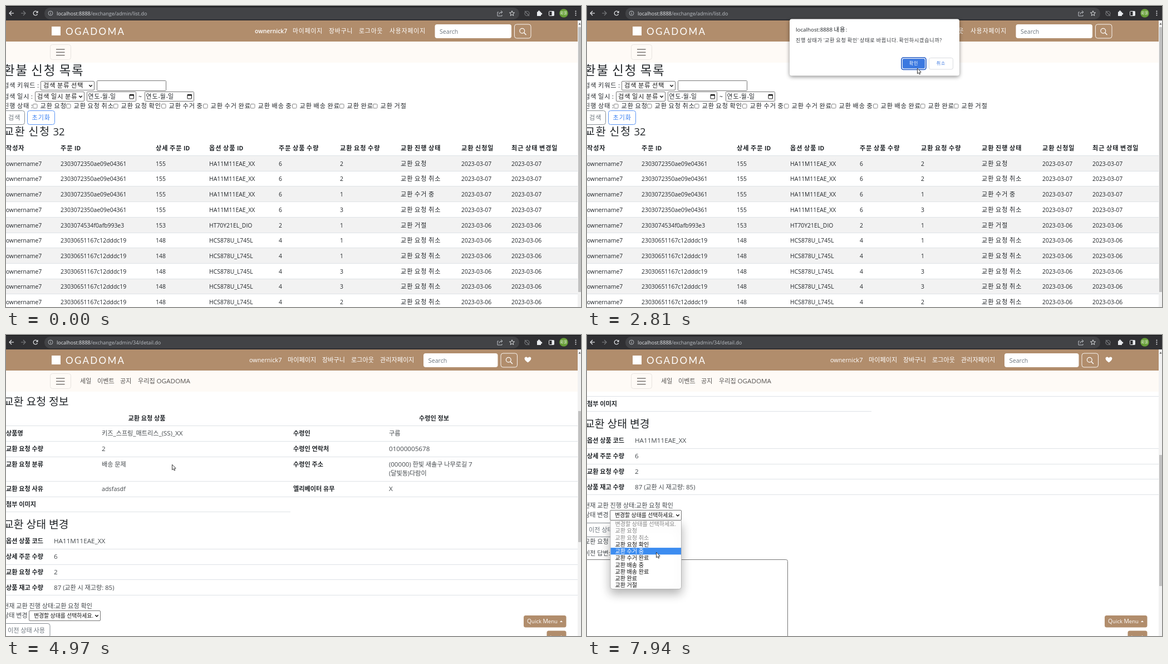
Recreate the animation shown at these times as an HTML page with a canvas. Size 1033 px wide and 542 px high, loop 8000 ms.

```html
<!DOCTYPE html>
<html lang="ko">
<head>
<meta charset="utf-8">
<title>Exchange admin</title>
<style>
html, body { margin: 0; width: 100%; height: 100%; overflow: hidden; background: #fff; }
canvas { display: block; }
</style>
</head>
<body>
<canvas id="stage" width="1033" height="542"></canvas>
<script>
const ctx = document.getElementById('stage').getContext('2d');
const LOOP = 8000, W = 1033, H = 542, VIEW = 1027;
const INK = '#212529', GRAY = '#6c757d', LINE = '#dee2e6', BROWN = '#b18d6c';
const BRAND = 'OGADOMA';

// Relative glyph sizes and Korean letter spacing of the two page typefaces
const LIST = { hangul: 1.07, caps: 1, spacing: 0.09 };
const DETAIL = { hangul: 1.03, caps: 1.08, spacing: 0 };
let face = LIST;

const NAV = 3500, DIALOG_IN = 1980, DIALOG_OUT = 3090, MENU_OPEN = 7290;
const POINTER = [
  [70, 984, 391], [200, 835, 140], [270, 700, 96], [400, 471, 205], [590, 471, 205],
  [1060, 207, 279], [1260, 206, 279], [1530, 206, 279], [1660, 217, 279],
  [1850, 217, 279], [1920, 224, 280], [2340, 224, 280], [2740, 593, 112],
  [3160, 593, 112], [3900, 320, 256], [4100, 320, 256], [4160, 330, 238],
  [4490, 330, 238], [4970, 298, 233], [5170, 275, 234], [5600, 88, 372],
  [5970, 215, 375], [6050, 215, 375], [6400, 234, 374], [6560, 234, 374],
  [6850, 262, 352], [7180, 150, 315], [7330, 150, 315], [7670, 125, 392],
  [7840, 125, 392], [7880, 124, 391], [8000, 124, 391]
];
const SCROLL = [[4500, 0], [4660, 67], [4970, 222], [5100, 336], [6540, 336], [6800, 404]];

const clamp = v => Math.max(0, Math.min(1, v));
const smooth = v => v * v * (3 - 2 * v);

function track(keys, t, ease = v => v) {
  let i = 0;
  while (i < keys.length - 2 && t > keys[i + 1][0]) i++;
  const a = keys[i], b = keys[i + 1];
  const p = ease(clamp((t - a[0]) / (b[0] - a[0])));
  return a.slice(1).map((v, k) => v + (b[k + 1] - v) * p);
}

// Draws mixed Korean and Latin text, centred vertically on y; returns its end
function text(str, x, y, { size = 10.4, color = INK, weight = 400, align = 'left' } = {}) {
  const runs = str.match(/[가-힣]+|[0-9A-Z_]+|[^가-힣0-9A-Z_]+/g).map(s => {
    const hangul = /[가-힣]/.test(s);
    const scale = hangul ? face.hangul : /[0-9A-Z_]/.test(s) ? face.caps : 1;
    const family = hangul ? '"Noto Sans CJK KR", "Noto Sans CJK", sans-serif'
                          : '"Open Sans", "Noto Sans", sans-serif';
    const thickness = hangul && weight === 400 ? 300 : weight;
    const font = `${thickness} ${size * scale}px ${family}`;
    const spacing = `${hangul ? size * face.spacing : 0}px`;
    ctx.font = font;
    ctx.letterSpacing = spacing;
    return { s, font, spacing, width: ctx.measureText(s).width };
  });
  if (align === 'center') x -= runs.reduce((sum, r) => sum + r.width, 0) / 2;
  ctx.fillStyle = color;
  for (const r of runs) {
    ctx.font = r.font;
    ctx.letterSpacing = r.spacing;
    ctx.fillText(r.s, x, y + size * 0.36);
    x += r.width;
  }
  return x;
}

function rect(x, y, w, h, color) {
  ctx.fillStyle = color;
  ctx.fillRect(x, y, w, h);
}

function rule(y, w = VIEW) {
  rect(0, Math.floor(y), w, 1, LINE);
}

function box(x, y, w, h, r, fill, stroke, width = 1) {
  ctx.beginPath();
  ctx.roundRect(x, y, w, h, r);
  if (fill) { ctx.fillStyle = fill; ctx.fill(); }
  if (stroke) { ctx.strokeStyle = stroke; ctx.lineWidth = width; ctx.stroke(); }
}

function path(points, { stroke, fill, width = 1.2, close = false }) {
  ctx.beginPath();
  points.forEach(([x, y]) => ctx.lineTo(x, y));
  if (close) ctx.closePath();
  if (fill) { ctx.fillStyle = fill; ctx.fill(); }
  if (stroke) { ctx.strokeStyle = stroke; ctx.lineWidth = width; ctx.stroke(); }
}

function arc(x, y, r, { stroke, fill, width = 1.2, from = 0, to = Math.PI * 2 }) {
  ctx.beginPath();
  ctx.arc(x, y, r, from, to);
  if (fill) { ctx.fillStyle = fill; ctx.fill(); }
  if (stroke) { ctx.strokeStyle = stroke; ctx.lineWidth = width; ctx.stroke(); }
}

function shadowed(blur, dy, color, draw) {
  ctx.save();
  ctx.shadowBlur = blur;
  ctx.shadowOffsetY = dy;
  ctx.shadowColor = color;
  draw();
  ctx.restore();
}

function toolbar(page) {
  const light = '#e8eaed', dim = '#77797c', soft = '#bdc1c6';
  rect(0, 0, W, 26, '#303033');
  rect(0, 0, W, 1, '#111214');
  box(69, 3, 853, 21, 10, '#424346');
  const arrow = (x, dir, stroke) => {
    path([[x - 4 * dir, 13], [x + 4 * dir, 13]], { stroke });
    path([[x, 9], [x + 4 * dir, 13], [x, 17]], { stroke });
  };
  arrow(10, -1, light);
  arrow(31, 1, dim);
  arc(53, 13, 3.8, { stroke: light, from: 0.4, to: 5.5 });
  path([[57.5, 8.5], [57.5, 12.5], [53.5, 12.5]], { fill: light });
  arc(80, 13, 4, { stroke: soft, width: 0.9 });
  rect(79.5, 12.3, 1, 3, soft);
  rect(79.5, 10.5, 1, 1, soft);
  const end = text('localhost:8888', 91, 13.5, { size: 9, color: light });
  text(`/exchange/admin/${page}.do`, end, 13.5, { size: 9, color: soft });

  path([[885, 11], [883, 11], [883, 18], [891, 18], [891, 16]], { stroke: soft, width: 1 });
  path([[886, 15], [887, 12], [891, 11]], { stroke: soft, width: 1 });
  path([[889, 8.5], [892, 11], [889, 13.5]], { stroke: soft, width: 1 });
  const star = Array.from({ length: 10 }, (_, i) => {
    const a = i * Math.PI / 5 - Math.PI / 2, r = i % 2 ? 2.1 : 4.8;
    return [909 + r * Math.cos(a), 13.5 + r * Math.sin(a)];
  });
  path(star, { stroke: light, width: 0.9, close: true });
  arc(936, 13.5, 4, { stroke: dim });
  path([[932, 9], [940, 18]], { stroke: dim });
  rect(954, 10.5, 7, 7.5, light);
  arc(957.5, 10, 1.8, { fill: light });
  arc(961.5, 14, 1.8, { fill: light });
  box(975.5, 9.5, 9, 8, 1, null, light);
  rect(980.5, 9.5, 4, 8, light);
  arc(1002, 13, 7.8, { fill: '#689f38' });
  text('회원', 1002, 13, { size: 6, color: '#fff', align: 'center' });
  for (const y of [9.5, 13, 16.5]) arc(1023.5, y, 1, { fill: light });
}

function siteHeader(detail) {
  rect(0, 26, VIEW, 38, BROWN);
  rect(0, 64, VIEW, 38, '#fefaf6');
  rect(82, 37, 16, 16, '#fff');
  ctx.save();
  ctx.font = '400 17px Lato, sans-serif';
  ctx.letterSpacing = '2.3px';
  ctx.fillStyle = '#fff';
  ctx.fillText(BRAND, 107, 51.5);
  ctx.restore();

  const links = detail
    ? [['ownernick7', 437], ['마이페이지', 506], ['장바구니', 568], ['로그아웃', 620], ['관리자페이지', 672]]
    : [['ownernick7', 447], ['마이페이지', 515], ['장바구니', 580], ['로그아웃', 634], ['사용자페이지', 689]];
  links.forEach(([label, x], i) => text(label, x, 45.3,
    { size: detail ? 10.8 : i ? 10.1 : 10.4, color: '#fff', weight: detail ? 400 : i ? 500 : 600 }));
  const x = detail ? 750 : 770.5, w = detail ? 133.5 : 137.5;
  box(x, 33, w, 25, 4, '#fff');
  text('Search', x + 8.5, 45.7, { size: 10.6, color: GRAY });
  const bx = x + w + 5.5;
  box(bx, 33, 29.5, 25, 4, null, '#f8f4f0');
  arc(bx + 13.8, 44.8, 4.4, { stroke: '#fff' });
  path([[bx + 17, 48], [bx + 21, 52]], { stroke: '#fff', width: 1.4 });
  if (detail) {
    ctx.fillStyle = '#fff';
    ctx.beginPath();
    ctx.moveTo(937.5, 49.5);
    ctx.bezierCurveTo(926.5, 43, 933.5, 36.5, 937.5, 41.2);
    ctx.bezierCurveTo(941.5, 36.5, 948.5, 43, 937.5, 49.5);
    ctx.fill();
  }

  box(79.5, 69.5, 37, 27, 4, null, '#e8e4e0');
  for (const y of [78, 83.3, 88.6]) rect(90, y - 0.6, 15.5, 1.3, '#66625f');
  if (detail) {
    [['세일', 133], ['이벤트', 164], ['공지', 205], [`우리집 ${BRAND}`, 237]]
      .forEach(([label, lx]) => text(label, lx, 83.3, { size: 10.8, color: '#555250', weight: 500 }));
  }
}

function scrollbar(top, height) {
  rect(VIEW, 26, W - VIEW, H - 26, '#f1f1f1');
  path([[1028.5, 33.5], [1030.5, 30.5], [1032.5, 33.5]], { fill: '#555' });
  rect(1028, top, 5, height, '#c1c1c1');
}

function select(x, y, w, h, label, tx, size) {
  box(x + 0.5, y + 0.5, w - 1, h - 1, 1.5, '#fff', '#767676');
  text(label, tx, y + h / 2, { size, color: '#111' });
  const cx = x + w - 7, cy = y + h / 2;
  path([[cx - 2.7, cy - 1.3], [cx, cy + 1.5], [cx + 2.7, cy - 1.3]], { stroke: '#111', width: 1.4 });
}

function dateInput(x) {
  box(x + 0.5, 154.5, 88, 17, 1, '#fff', '#767676');
  text('연도-월-일', x + 2.5, 163, { size: 10.2 });
  box(x + 77, 159.5, 7.5, 7.5, 0.5, null, '#111');
  rect(x + 77, 159, 7.5, 2.5, '#111');
}

const STATES = ['교환 요청', '교환 요청 취소', '교환 요청 확인', '교환 수거 중', '교환 수거 완료',
  '교환 배송 중', '교환 배송 완료', '교환 완료', '교환 거절'];
const CHECK_X = [48, 108, 193, 279, 354, 439, 514, 599, 659];
const COLUMNS = [['작성자', 0], ['주문 ID', 98], ['상세 주문 ID', 269], ['옵션 상품 ID', 365],
  ['주문 상품 수량', 490], ['교환 요청 수량', 600], ['교환 진행 상태', 709],
  ['교환 신청일', 818], ['최근 상태 변경일', 908]];
const A = ['2303072350ae09e04361', '155', 'HA11M11EAE_XX', '6'];
const B = ['2303074534f0afb993e3', '153', 'HT70Y21EL_DIO', '2'];
const C = ['23030651167c12dddc19', '148', 'HCS878U_L745L', '4'];
const ROWS = [[A, 2, 0], [A, 2, 1], [A, 1, 3], [A, 3, 1], [B, 1, 8],
  [C, 1, 1], [C, 1, 1], [C, 3, 1], [C, 3, 1], [C, 2, 1]];

function listPage() {
  face = LIST;
  text('환불 신청 목록', -5, 116.5, { size: 20.9 });
  text('검색 키워드 :', -5, 143);
  select(62, 135, 97, 17, '검색 분류 선택', 67, 10.4);
  box(163.5, 134.5, 124, 18, 1, '#fff', '#767676');
  text('검색 일시 :', -5, 163);
  select(52, 154, 89, 18, '검색 일시 분류', 56, 10.4);
  dateInput(145);
  text('~', 238, 163);
  dateInput(249);
  text('진행 상태 :', -5, 180);
  STATES.forEach((s, i) => {
    box(CHECK_X[i] + 0.5, 176.5, 7.5, 7.5, 1.5, '#fff', '#767676', 0.9);
    text(s, CHECK_X[i] + 13.5, 180);
  });
  box(-10, 188.5, 43.5, 25, 4, null, '#858c93');
  text('검색', 4, 201, { color: GRAY });
  box(38.5, 188.5, 49, 25, 4, null, '#5a94f5');
  text('초기화', 46.5, 201, { color: '#3a80f2' });
  text('교환 신청 32', -4, 226, { size: 18.4 });

  COLUMNS.forEach(([label, x]) => text(label, x, 256, { weight: 700 }));
  ROWS.forEach(([order, count, state], i) => {
    const top = Math.floor(269.5 + i * 27.7), y = 284 + i * 27.7;
    if (i % 2 === 0) rect(0, top, VIEW, 28, '#f2f2f2');
    rule(top);
    const day = i < 4 ? '2023-03-07' : '2023-03-06';
    ['ownername7', ...order, String(count), STATES[state], day, day]
      .forEach((cell, k) => text(cell, COLUMNS[k][1], y));
  });
  siteHeader(false);
  scrollbar(38, 477);
}

const ORDER = [['주문 날짜', '2023-03-07 01:24'], ['주문번호', '2303072350ae09e04361'],
  ['총 구매 금액', '2516000'], ['주문자', 'ownername7'], ['주문자 전화번호', '01000001234'],
  ['주문자 이메일', 'own7@example.com'], ['주문 상품', '사이드테이블(조명)_FK 등 2건']];
const REQUEST = [
  [400.5, '상품명', '키즈_스프링_매트리스_(SS)_XX', '수령인', '구름'],
  [428.2, '교환 요청 수량', '2', '수령인 연락처', '01000005678'],
  [456, '교환 요청 분류', '배송 문제', '수령인 주소', '(00000) 한빛 새솔구 나무로길 7'],
  [500, '교환 요청 사유', 'adsfasdf', '엘리베이터 유무', 'X']];
const STOCK = [['옵션 상품 코드', 'HA11M11EAE_XX'], ['상세 주문 수량', '6'],
  ['교환 요청 수량', '2'], ['상품 재고 수량', '87 (교환 시 재고량: 85)']];
const PROMPT = '변경할 상태를 선택하세요.';

function detailPage(scroll) {
  face = DETAIL;
  const value = (s, x, y) => text(s, x, y, { size: 10.8, color: '#43484c' });
  const label = (s, x, y) => text(s, x, y, { size: 10.8, weight: 700 });
  const heading = (s, y) => text(s, -4, y, { size: 18.8 });

  ctx.save();
  ctx.translate(0, -Math.round(scroll));
  heading('주문 내역', 110);
  ORDER.forEach(([k, v], i) => {
    const y = 140 + i * 27.7;
    label(k, 0, y);
    value(v, 344, y);
    rule(y + 13.7);
  });
  heading('교환 요청 정보', 343);
  text('교환 요청 상품', 253, 373, { size: 10.8, weight: 700, align: 'center' });
  text('수령인 정보', 769, 373, { size: 10.8, weight: 700, align: 'center' });
  [386.7, 414.4, 442.1, 486.3, 514].forEach(y => rule(y));
  for (const [y, k, v, k2, v2] of REQUEST) {
    label(k, 0, y);
    value(v, 172, y);
    label(k2, 516, y);
    value(v2, 688, y);
  }
  value('(달빛동)다람이', 688, 472);
  label('첨부 이미지', 0, 527.7);
  rule(541.7, 511);

  heading('교환 상태 변경', 564.7);
  STOCK.forEach(([k, v], i) => {
    const y = 594.6 + i * 27.7;
    label(k, 0, y);
    value(v, 86, y);
    rule(y + 13.7);
  });
  value('현재 교환 진행 상태:교환 요청 확인', -5, 710.7);
  value('상태 변경', -5, 728.5);
  select(41, 719, 129, 19, PROMPT, 50, 9.55);
  box(-10, 742.5, 89, 25, 4, null, '#858c93');
  text('이전 상태 사용', 3, 755, { size: 10.8, color: GRAY });
  value('교환 요청 답변', -5, 776);
  value('이전 답변: null', -5, 797.5);
  box(-10, 808.5, 370.5, 220, 3, '#fff', '#767676');
  ctx.restore();

  siteHeader(true);
  box(930, 505, 76.5, 21.5, 3.5, BROWN);
  text('Quick Menu', 936, 515.8, { size: 9.6, color: '#fff' });
  path([[995, 517], [997.5, 514.3], [1000, 517]], { fill: '#fff' });
  box(971.5, 532.5, 35, 21.5, 3.5, BROWN);
  text('top', 977.5, 543.5, { size: 9.6, color: '#fff' });
  path([[995, 544], [997.5, 541], [1000, 544]], { fill: '#fff' });
  scrollbar(39.5 + scroll * 0.437, 236);
}

function dialog(alpha) {
  face = LIST;
  ctx.save();
  ctx.globalAlpha = alpha;
  shadowed(7, 2, 'rgba(0,0,0,.45)', () => box(364, 23.5, 305, 102, 4, '#fff'));
  text('localhost:8888 내용:', 375, 42, { size: 9.8 });
  text("진행 상태가 '교환 요청 확인' 상태로 바뀝니다. 확인하시겠습니까?", 375, 62, { size: 8.5, color: '#33363a' });
  box(565, 93, 44, 21.5, 3.5, '#fff', '#1c56c4', 1.6);
  box(567, 95, 40, 17.5, 2, '#3b78e0');
  text('확인', 587, 103.5, { size: 7.6, color: '#fff', align: 'center' });
  box(614.5, 93.5, 43, 20.5, 3, '#fff', '#dadce0');
  text('취소', 636, 103.5, { size: 7.6, color: '#3b78e0', align: 'center' });
  ctx.restore();
}

function dropdown(pointerY) {
  face = DETAIL;
  const top = 334.3, step = 12.25, picked = Math.floor((pointerY - top) / step);
  shadowed(18, 8, 'rgba(0,0,0,.3)', () => box(42, 334, 127.5, 123.5, [0, 0, 4, 4], '#fff', '#aaa', 0.8));
  [PROMPT, ...STATES].forEach((s, i) => {
    const active = i === picked && i > 2;
    if (active) rect(42.5, top + i * step - 0.2, 126.5, step, '#3c8cf0');
    text(s, 50.5, top + 6.2 + i * step, { size: 9.8, color: active ? '#fff' : i < 3 ? '#858585' : '#111' });
  });
}

function pointer(t, x, y) {
  if (t >= 1060 && t < 1530) {
    path([[x - 2, y - 4.5], [x + 2, y - 4.5]], { stroke: '#222', width: 1 });
    path([[x, y - 4.5], [x, y + 5]], { stroke: '#222', width: 1 });
    path([[x - 2, y + 5], [x + 2, y + 5]], { stroke: '#222', width: 1 });
    return;
  }
  const shape = [[0, 0], [0, 9.6], [2.2, 7.6], [3.7, 10.8], [5.2, 10.1], [3.8, 7], [6.7, 6.8]];
  path(shape.map(([dx, dy]) => [x + 0.5 + dx, y + 0.3 + dy]),
    { fill: '#fff', stroke: '#222', width: 0.9, close: true });
}

function render(t) {
  rect(0, 0, W, H, '#fff');
  const [px, py] = track(POINTER, t, smooth);
  if (t < NAV) listPage();
  else detailPage(track(SCROLL, t)[0]);
  face = LIST;
  toolbar(t < NAV ? 'list' : '34/detail');
  const alpha = clamp((t - DIALOG_IN) / 160) * clamp(1 - (t - DIALOG_OUT) / 120);
  if (alpha > 0) dialog(alpha);
  if (t >= MENU_OPEN) dropdown(py);
  if (t >= 70) pointer(t, px, py);
}

const start = performance.now();
function tick() {
  render((performance.now() - start) % LOOP);
  requestAnimationFrame(tick);
}
tick();
</script>
</body>
</html>
```
